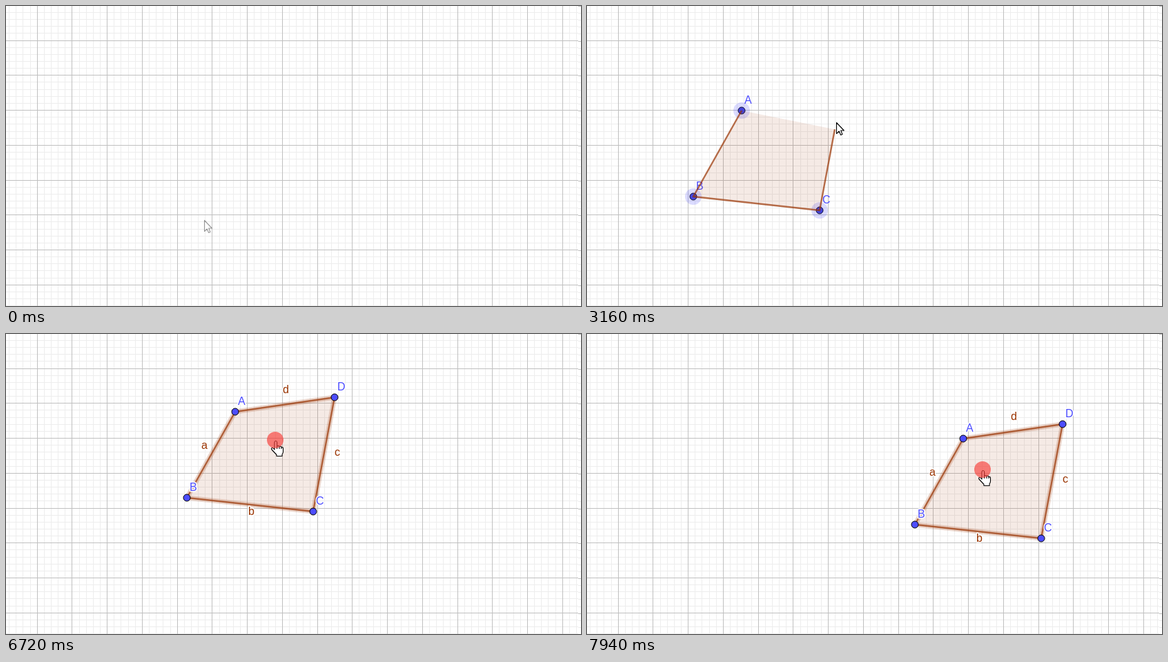
Animation, 833 px wide and 436 px high, one loop 8000 ms. Source, as an HTML page with a canvas:

```html
<!DOCTYPE html>
<html lang="en">
<head>
<meta charset="utf-8">
<title>Drawing and dragging a polygon</title>
<style>
html, body { margin: 0; width: 100%; height: 100%; overflow: hidden; background: #fff; }
canvas { display: block; width: 100%; height: 100%; }
</style>
</head>
<body>
<canvas id="stage" width="833" height="436"></canvas>
<script>
const W = 833, H = 436, LOOP = 8000, LAG = 30, PITCH = 50.735;
const ctx = document.getElementById('stage').getContext('2d');

const pt = (x, y) => ({ x, y });
const A = pt(224, 152), B = pt(154, 277), C = pt(337, 297), D = pt(368, 131);
const VERTS = [A, B, C, D];
const SIDES = [pt(175, 206), pt(243, 302), pt(368, 216), pt(293, 125)];

// One click per vertex, then one on the first vertex to close the shape
const CLICKS = [560, 1700, 2500, 3700, 5110], HOLD = 140;
const CLOSED = CLICKS[4] + HOLD;
const HAND = 4440, PRESS = 6180, DRAG = 6250, TURN = 7100, DROP = 7880;

// Moves: start, end, destination
const START = pt(287, 311);
const POINTER = [
  [30, 560, A], [700, 1460, B], [1700, 2500, C], [2700, 3370, D],
  [3700, 4450, pt(222, 153)], [CLOSED, 5640, pt(253, 181)], [5930, PRESS, pt(269, 181)],
  [DRAG, TURN, pt(477, 136)], [TURN, DROP, pt(573, 198)]
];
const SHIFT = [[DRAG, TURN, pt(186, -67)], [TURN, DROP, pt(321, 0)]];

const ARROW = new Path2D('M.5 .5V16.5L4.2 13L6.6 18.5L9 17.5L6.7 12H11.3Z');
const PALM = new Path2D('M-1 13V2.5Q-1 .5 .8 .5Q2.6 .5 2.6 2.5V8Q5.5 6.8 6 8.6Q8.6 7.6 9 9.6' +
  'Q11.5 9 11.5 11.5V16Q11.5 18 10 20V22.5H2V20.5L-5 13Q-6 11 -4.5 10.5Q-3 10 -1 13Z');
const FINGERS = new Path2D('M2.6 8V12M6 8.6V12M9 9.6V12');

function ease(t, a, b) {
  const u = Math.max(0, Math.min(1, (t - a) / (b - a)));
  return u * u * (3 - 2 * u);
}

function travel(home, moves, t) {
  return moves.reduce((p, [a, b, q]) => {
    const e = ease(t, a, b);
    return pt(p.x + (q.x - p.x) * e, p.y + (q.y - p.y) * e);
  }, home);
}

function disc(p, r, color) {
  ctx.beginPath();
  ctx.arc(p.x, p.y, r, 0, 2 * Math.PI);
  ctx.fillStyle = color;
  ctx.fill();
}

function gridLines(gap, color) {
  ctx.fillStyle = color;
  for (let p = 44.72 - PITCH; p < W; p += gap) {
    ctx.fillRect(Math.round(p), 0, 1, H);
    const y = Math.round(p + 4.88);
    ctx.fillRect(0, y, 829, 1);
    ctx.fillRect(829, y + 1, W - 829, 1);
  }
}

function outline(pts, close, width, alpha) {
  ctx.beginPath();
  pts.forEach(p => ctx.lineTo(p.x, p.y));
  if (close) ctx.closePath();
  ctx.lineWidth = width;
  ctx.strokeStyle = `rgba(153,51,0,${alpha})`;
  ctx.stroke();
}

function shape(pts, close, picked) {
  if (pts.length > 2) {
    ctx.beginPath();
    pts.forEach(p => ctx.lineTo(p.x, p.y));
    ctx.fillStyle = 'rgba(153,51,0,.1)';
    ctx.fill();
  }
  if (picked) outline(pts, close, 7, 0.2);
  outline(pts, close, 2.4, 0.7);
}

function dot(p, picked) {
  disc(p, 5, picked ? '#4343d2' : '#4d4dff');
  ctx.lineWidth = 1;
  ctx.strokeStyle = '#000';
  ctx.stroke();
  if (picked) disc(p, 12, 'rgba(77,77,255,.2)');
}

function label(s, x, y, color, outlined) {
  if (outlined) {
    ctx.lineWidth = 3;
    ctx.strokeStyle = '#fff';
    ctx.strokeText(s, x, y);
  }
  ctx.fillStyle = color;
  ctx.fillText(s, x, y);
}

function nameVerts(verts, outlined) {
  verts.forEach((v, i) => label('ABCD'[i], v.x + 4, v.y - 10, '#4d4dff', outlined));
}

function building(t) {
  const verts = VERTS.filter((v, i) => t >= CLICKS[i] + HOLD);
  if (!verts.length) return;
  verts.forEach(v => dot(v, true));
  nameVerts(verts, false);
  const tip = t >= HAND ? A : travel(START, POINTER, t - LAG);
  shape([...verts, tip], false, false);
}

function finished(t) {
  const s = travel(pt(0, 0), SHIFT, t);
  ctx.save();
  ctx.translate(Math.round(s.x), Math.round(s.y));
  shape(VERTS, true, t > DRAG);
  SIDES.forEach((p, i) => label('abcd'[i], p.x, p.y, '#993300', true));
  nameVerts(VERTS, true);
  VERTS.forEach(v => dot(v, false));
  ctx.restore();
}

function pointer(t) {
  const p = travel(START, POINTER, t), hand = t >= HAND;
  const body = hand ? PALM : ARROW;
  ctx.save();
  ctx.translate(Math.round(p.x), Math.round(p.y));
  ctx.globalAlpha = t < 70 ? 0.4 : 1;
  ctx.lineWidth = 1.1;
  ctx.fillStyle = '#fff';
  ctx.strokeStyle = '#000';
  ctx.fill(body);
  ctx.stroke(body);
  if (hand) ctx.stroke(FINGERS);
  const pressed = t >= PRESS || CLICKS.some(c => t >= c && t < c + HOLD);
  if (pressed) disc(pt(0, -1), 12, 'rgba(246,60,56,.65)');
  ctx.restore();
}

function frame(now) {
  const t = now % LOOP;
  ctx.fillStyle = '#fff';
  ctx.fillRect(0, 0, W, H);
  gridLines(PITCH / 5, '#ededed');
  gridLines(PITCH, '#c0c0c0');
  ctx.font = '16px "Liberation Sans", Arial, sans-serif';
  ctx.lineJoin = 'round';
  if (t < CLOSED) building(t);
  else finished(t);
  pointer(t);
  requestAnimationFrame(frame);
}
requestAnimationFrame(frame);
</script>
</body>
</html>
```
